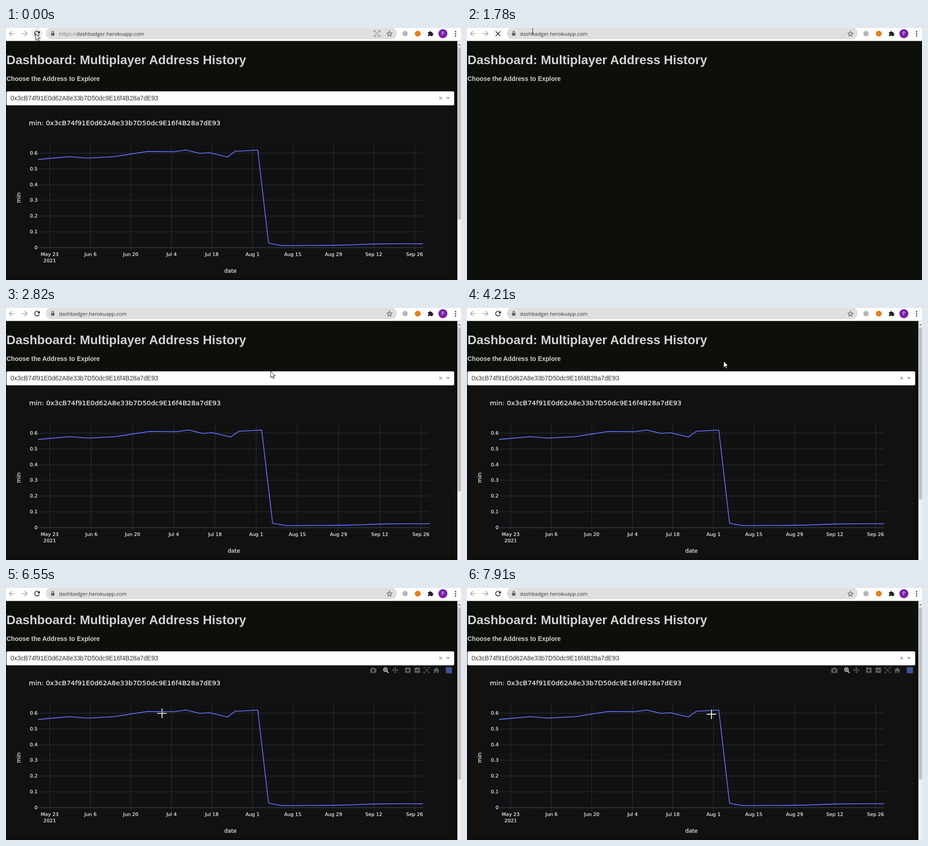
Animation, 1005 px wide and 557 px high, one loop 8000 ms. Source, as an HTML page:

```html
<!DOCTYPE html>
<html lang="en">
<head>
<meta charset="utf-8">
<title>Address history dashboard</title>
<style>
  html, body { margin: 0; width: 100%; height: 100%; overflow: hidden; background: #0c0f0a; }
  svg { display: block; width: 1005px; height: 557px; }
  text { white-space: pre; }
  .ui { font: 11.35px "Open Sans", "Noto Sans", sans-serif; fill: #303236; }
  .page { font-family: "Liberation Sans", Arial, sans-serif; }
  .plot { font: 10.75px "DejaVu Sans", Verdana, sans-serif; fill: #f2f5fa; }
  .plot text { stroke: #f2f5fa; stroke-width: .2px; }
  .grid { stroke: #283442; }
  .trace { stroke: #636efa; stroke-width: 1.8; fill: none; stroke-linejoin: round; }
  .tip { font: 11.2px "Liberation Sans", Arial, sans-serif; fill: #fff; }
  .line { fill: none; stroke: currentColor; stroke-width: 1.6; }
  .thin { stroke-width: 1.3; }
  .corners { stroke-dasharray: 6 6; stroke-dashoffset: 3; }
  .mid { text-anchor: middle; }
  .end { text-anchor: end; }
  #invert { mix-blend-mode: difference; }
  #press { fill: #ececec; animation: press 8s linear infinite; }
  @keyframes press {
    0%, 6.2%, 19% { fill: #ececec; }
    2% { fill: #d8d8d8; }
    22% { fill: #f4f4f4; }
    24%, 100% { fill: #fff; }
  }
</style>
</head>
<body>
<svg viewBox="0 0 1005 557">
  <rect width="1005" height="557" fill="#0c0f0a"/>

  <!-- browser bar -->
  <rect width="1005" height="28.6" fill="#fff"/>
  <rect x="88" y="-1" width="775" height="26" rx="13" fill="#dfdfdf"/>
  <g class="line" color="#a3a5a8">
    <path id="back" d="M19 12.5H8m5-5.5l-5.5 5.5 5.500 5.500"/>
    <use href="#back" transform="matrix(-1 0 0 1 54 0)"/>
  </g>
  <circle id="press" cx="68.5" cy="12.5" r="12"/>
  <g id="reload" color="#202124">
    <path class="line" d="M73 9.300A5.300 5.300 0 1 0 73.600 14"/>
    <path d="M74.600 6.500v5.300h-5.300z"/>
  </g>
  <path id="stop" class="line" color="#202124" d="M63.500 7.500l10 10m0-10l-10 10"/>
  <g color="#5f6368">
    <rect x="99.500" y="11" width="7.500" height="6" rx="1" fill="#5f6368"/>
    <path class="line thin" d="M101 11V9.500a2.200 2.200 0 0 1 4.500 0V11"/>
    <polygon id="star" class="line thin"/>
  </g>
  <g id="urlFull">
    <text class="ui" x="117" y="16.500"><tspan fill="#76797d">https://</tspan>dashbadger.herokuapp.com</text>
    <g color="#5f6368">
      <rect class="line thin corners" x="813.500" y="6.500" width="12" height="12"/>
      <path class="line" stroke-dasharray="2 2" d="M816.500 10.500h6m-6 4h6"/>
    </g>
  </g>
  <text id="urlShort" class="ui" x="117" y="16.500">dashbadger.herokuapp.com</text>
  <circle cx="881.500" cy="12.500" r="6" fill="#b3b8b5"/>
  <circle cx="909.500" cy="12.500" r="6.500" fill="#e2811f"/>
  <path fill="#202124" d="M932 9h3a2 2 0 0 1 4 0h3v3a2 2 0 0 1 0 4v2h-3.500a1.800 1.800 0 0 0-3.500 0h-3v-3a1.800 1.800 0 0 0 0-3.500z"/>
  <circle cx="965" cy="12.500" r="10" fill="#7720a5"/>
  <text class="ui mid" x="965" y="16.300" style="fill:#fff;font-size:10.500px">P</text>
  <path d="M993 8v10" stroke="#303236" stroke-width="3" stroke-linecap="round" stroke-dasharray="0 4.700"/>

  <!-- page -->
  <g id="heads" class="page" font-weight="700" fill="#d3d3d3">
    <text x="1" y="80" font-size="27.750">Dashboard: Multiplayer Address History</text>
    <text x="1" y="117" font-size="13.900">Choose the Address to Explore</text>
  </g>
  <g id="pageParts"></g>
  <g id="scroll">
    <rect x="997" y="28.600" width="8" height="529" fill="#f1f1f1"/>
    <path d="M998.500 38.500l3-3.500 3 3.500z" fill="#777"/>
    <rect id="thumbShort" x="998" y="43" width="7" height="362" fill="#c1c1c1"/>
    <rect id="thumbLong" x="998" y="43" width="7" height="380" fill="#c1c1c1"/>
  </g>
  <g id="modebar" fill="#5d5f61" color="#5d5f61">
    <path d="M804.500 178h3.500l1-2h4.500l1 2h3.500v9.500h-13.500z"/>
    <circle cx="811.200" cy="182.500" r="2.800" fill="#111"/>
    <path class="line" color="#bfc1c3" style="stroke-width:2" d="M842 180.500a4 4 0 1 0-8 0a4 4 0 1 0 8 0m-1 3l4 4.500m-9-7.500h4m-2-2v4"/>
    <path class="line thin" d="M854 181.500h12m-6-6v12m-4-8l-2 2 2 2m8-4l2 2-2 2m-6-6l2-2 2 2m-4 8l2 2 2-2"/>
    <path d="M881.500 176h12v11.500h-12zm21 0h12v11.500h-12z"/>
    <path stroke="#111" stroke-width="2" d="M884 182h7m-3.500-3.500v7m17.500-3.500h7"/>
    <g class="line thin">
      <rect class="corners" x="923" y="175.500" width="12" height="12"/>
      <path d="M926 178.500l6.500 6.500m0-6.500l-6.500 6.500"/>
    </g>
    <path d="M943.500 182l7-6.500 7 6.500h-2v5.500h-3.500v-4h-3v4h-3.500v-5.500z"/>
    <rect x="971.500" y="175" width="13.500" height="13.500" fill="#3f5590"/>
  </g>
  <g id="tips"></g>

  <!-- pointers -->
  <g id="pointer">
    <path id="arrow" d="M0 0v14.500l3.400-3.100 2.400 5.400 2.200-1-2.300-5.300h4.600z" fill="#fff" stroke="#000"/>
    <path id="beam" d="M-2.500-6.500h5m-2.500 0v13m-2.500 0h5" stroke="#222" fill="none"/>
  </g>
  <g id="invert"><path id="cross" d="M-10.500 0h21M0-10.500v21" stroke="#fff" stroke-width="2"/></g>
</svg>
<script>
const LOOP = 8000;
const ADDRESS = '0x3cB74f91E0d62A8e33b7D50dc9E16f4B28a7dE93';
const $ = id => document.getElementById(id);
const sheet = document.head.appendChild(document.createElement('style'));
const pct = ms => (ms / LOOP * 100).toFixed(4) + '%';
let count = 0;

function animate(el, frames, timing) {
  const name = 'm' + count++;
  sheet.append(`@keyframes ${name}{${frames}}`);
  el.style.animation = `${name} ${LOOP}ms ${timing} infinite`;
}

// Visible only during the given [from, to] spans.
function show(el, ...spans) {
  let frames = spans[0][0] ? '0%{visibility:hidden}' : '';
  for (const [from, to] of spans)
    frames += `${pct(from)}{visibility:visible}${pct(to)}{visibility:hidden}`;
  animate(el, frames, 'step-end');
}

function follow(el, stops) {
  const frames = stops.map(([t, x, y]) => `${pct(t)}{transform:translate(${x}px,${y}px)}`);
  animate(el, frames.join(''), 'linear');
}

function group(parent, html) {
  const g = document.createElementNS('http://www.w3.org/2000/svg', 'g');
  g.innerHTML = html;
  return parent.appendChild(g);
}

// Bends of the curve: days since May 23, 2021 and value.
const data = [
  [-4.07, .561], [6.701, .5790243], [13.1, .5691706], [22.2, .5786412],
  [33.7, .6118357], [43.1, .6105924], [47, .6212086], [51.85, .5995341],
  [55.1, .6037218], [61.4, .5765093], [64.1, .6131475], [71.9, .6206], [75.6, .027]
];
const LAST = 128.95;
for (let day = 80; day < LAST; day += 4)
  data.push([day, .0122 + .0115 / (1 + Math.exp((106 - day) / 4))]);
data.push([LAST, .024]);

const START = Date.UTC(2021, 4, 23);
const dateAt = day => new Date(START + day * 864e5);
const dayText = (day, extra) => dateAt(day).toLocaleDateString('en-US',
  { month: 'short', day: 'numeric', timeZone: 'UTC', ...extra });
const LEFT = 70.5;
const yOf = v => 485 - v * 346.7;
const xScale = right => day => LEFT + (day - data[0][0]) / (LAST - data[0][0]) * (right - LEFT);
const snap = v => Math.round(v - .5) + .5;

function select(right) {
  return group($('pageParts'), `
    <rect x="1" y="140" width="${right - 1}" height="31" rx="3" fill="#fff"/>
    <text class="page" x="10" y="160" font-size="13.92" fill="#333">${ADDRESS}</text>
    <path class="line" color="#999" d="M${right - 33} 152l6 6m0-6l-6 6"/>
    <path d="M${right - 18} 153h8.500l-4.250 4.500z" fill="#999"/>`);
}

function chart(right) {
  const x = xScale(right), edge = right + 69, mid = (LEFT + right) / 2;
  let html = `<rect x="1" y="172" width="${edge - 1}" height="381" fill="#111"/>`;
  for (let day = 0; day < LAST; day += 14) {
    const px = snap(x(day));
    html += `<path class="grid" d="M${px} 258V493"/>
      <text class="mid" x="${px}" y="504">${dayText(day)}</text>`;
  }
  html += `<text class="mid" x="${snap(x(0))}" y="518">2021</text>`;
  for (let i = 0; i < 7; i++) {
    const py = snap(yOf(i / 10));
    html += `<path class="grid" stroke-width="${i ? 1 : 1.8}" d="M${LEFT} ${py}H${right}"/>
      <text class="end" x="69.8" y="${py + 3.5}">${i / 10}</text>`;
  }
  const pts = data.map(([d, v]) => `${x(d).toFixed(1)},${yOf(v).toFixed(1)}`).join(' ');
  html += `<polyline class="trace" points="${pts}"/>
    <text x="${1 + edge * .05}" y="214.5" font-size="14.75">min: ${ADDRESS}</text>
    <text class="mid" x="${mid}" y="541" font-size="12.2">date</text>
    <text class="mid" transform="translate(31.5 375) rotate(-90)" font-size="12.2">min</text>`;
  const g = group($('pageParts'), html);
  g.setAttribute('class', 'plot');
  return g;
}

// Pointer stops: time, x, y. The crosshair sweeps along the curve.
const cross = [
  [5000, 120, 287], [5150, 140, 280], [5400, 142, 281],
  [5510, 186, 286], [6550, 344.5, 277], [7910, 540, 279]
];
const path = [
  [0, 65.5, 12.5], [1510, 65.5, 12.5], [1780, 144.5, 5.5], [2300, 490, 184],
  [2820, 584.5, 139.5], [3340, 584.5, 139.5], [3630, 607, 107], [4010, 607, 107],
  [4210, 567.5, 117], [4810, 139, 290], ...cross, [LOOP, 540, 279]
];

function timeAt(x) {
  const i = cross.findIndex(stop => stop[1] > x);
  const [t0, x0] = cross[i - 1], [t1, x1] = cross[i];
  return t0 + (t1 - t0) * (x - x0) / (x1 - x0);
}

// A label appears near its bend, a little late.
const REACH = 12, LAG = 90;
function tip([day, value]) {
  const x = xScale(921)(day), time = dateAt(day).toISOString().slice(11, 16);
  const g = group($('tips'), `<path fill="#636efa" stroke="#fff"/>
    <text x="9.2" y="-3.5">date=${dayText(day, { year: 'numeric' })}, ${time}</text>
    <text x="9.2" y="11">min=${value}</text>`);
  g.setAttribute('class', 'tip');
  g.setAttribute('transform', `translate(${x.toFixed(1)} ${yOf(value).toFixed(1)})`);
  const w = g.querySelector('text').getComputedTextLength() + 12.5;
  g.firstChild.setAttribute('d', `M0 0L6 -5V-16.5H${w}V16.5H6V5Z`);
  show(g, [timeAt(x - REACH) + LAG, timeAt(x + REACH) + LAG]);
}

const star = Array.from({ length: 10 }, (_, i) => {
  const r = i % 2 ? 2.6 : 6, a = i * Math.PI / 5;
  return `${847 + r * Math.sin(a)},${13 - r * Math.cos(a)}`;
});
$('star').setAttribute('points', star.join(' '));

const LEAVE = 1220, HEADS = 1510, READY = 2400, RESIZE = 3060, PLOT = 4680;
const settled = [[0, LEAVE], [RESIZE, LOOP]];
const loaded = [[0, LEAVE], [READY, LOOP]];
show($('heads'), [0, LEAVE], [HEADS, LOOP]);
show($('urlFull'), [0, 700]);
show($('urlShort'), [700, LOOP]);
show($('reload'), [0, 720], [2350, LOOP]);
show($('stop'), [720, 2350]);
show(select(1005), [2200, READY]);
show(select(990), ...loaded);
show(chart(936), [READY, RESIZE]);
show(chart(921), ...settled);
show($('scroll'), ...loaded);
show($('thumbShort'), [READY, RESIZE]);
show($('thumbLong'), ...settled);
show($('modebar'), [4450, LOOP]);
show($('arrow'), [0, 1600], [1840, PLOT]);
show($('beam'), [1600, 1840]);
show($('cross'), [PLOT, LOOP]);
data.slice(1, 11).forEach(tip);
follow($('pointer'), path);
follow($('invert'), path);
</script>
</body>
</html>
```
